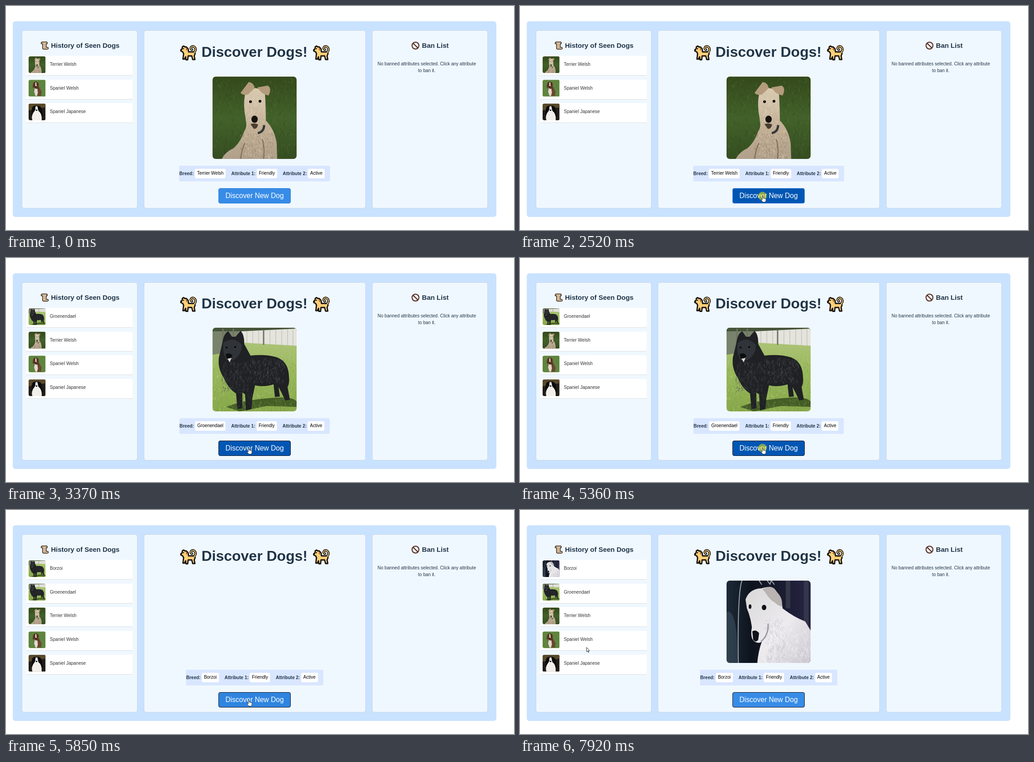
Animation, 1124 px wide and 498 px high, one loop 8 s. Source, as an HTML page:

```html
<!DOCTYPE html>
<html lang="en">
<head>
<meta charset="utf-8">
<title>Discover Dogs</title>
<style>
html, body { margin: 0; width: 100%; height: 100%; overflow: hidden; background: #fff; }
body { position: relative; font: 10px/15px Arial, "Liberation Sans", sans-serif; color: #213547; }
body > *, .panel, #center > *, .row > * { position: absolute; box-sizing: border-box; white-space: nowrap; }
#frame { left: 15px; top: 34px; width: 1070px; height: 435px; border-radius: 6px; background: #c9e2ff; }
.panel { top: 54px; height: 395.5px; border: 1px solid #cbd6e2; border-radius: 5px; background: #f0f8ff; }
h1, h2 { margin: 0; }
h1 { left: 432.4px; top: 82px; font-size: 32px; line-height: 40px; }
h2 { top: 78px; font-size: 15px; line-height: 20px; }
svg { overflow: visible; display: block; }
.row { position: absolute; left: 45px; width: 235px; height: 43px; background: #fff; border-bottom: 1px solid #dcdfe2; color: #333; }
.row svg { left: 5px; top: .5px; width: 37.5px; height: 37.5px; border-radius: 4px; overflow: hidden; }
.row span { left: 52px; top: 11px; }
#center { left: 0; top: 0; }
#photo { left: 457px; width: 186px; border-radius: 7px; overflow: hidden; }
#facts { left: 550px; top: 355px; height: 34.5px; transform: translateX(-50%); display: flex; align-items: center; border-radius: 3px; background: #d9e6ff; }
#facts b { margin: 0 2.8px 0 .5px; }
#facts span { height: 20.5px; line-height: 20.5px; padding: 0 4.7px; margin-right: 12px; border-radius: 3px; background: #fff; color: #000; }
#button { left: 470px; width: 160px; height: 34px; border: 1px solid #2b80dc; border-radius: 4px; color: #fff; font-size: 15.6px; line-height: 32px; text-align: center; }
#button.focus { border: 1.5px solid #101218; line-height: 31px; }
#ring { left: 527px; top: 413px; width: 19px; height: 19px; border-radius: 50%; background: rgba(255, 240, 0, .5); }
</style>
</head>
<body>
<svg width="0" height="0"><defs>
  <linearGradient id="lawn" x2="0" y2="1"><stop stop-color="#34491b"/><stop offset=".5" stop-color="#42612a"/><stop offset="1" stop-color="#354d20"/></linearGradient>
  <linearGradient id="coat" x2="0" y2="1"><stop stop-color="#d9cab1"/><stop offset=".6" stop-color="#c0ad93"/><stop offset="1" stop-color="#b0a08a"/></linearGradient>
  <linearGradient id="meadow" x2="0" y2="1"><stop stop-color="#b5c985"/><stop offset=".5" stop-color="#9ab85c"/><stop offset="1" stop-color="#87a84a"/></linearGradient>
  <linearGradient id="night"><stop stop-color="#1d2a38"/><stop offset=".3" stop-color="#0d131c"/><stop offset="1" stop-color="#272443"/></linearGradient>
  <linearGradient id="silk" x2="1" y2="1"><stop stop-color="#d9d8d8"/><stop offset=".55" stop-color="#edebee"/><stop offset="1" stop-color="#c9c5cf"/></linearGradient>

  <symbol id="terrier" viewBox="0 0 186 184" preserveAspectRatio="none">
    <path fill="url(#lawn)" d="M0 0H186V184H0z"/>
    <path data-blades="260,0,0,186,184,9" stroke="#597338"/>
    <path data-blades="160,0,0,186,184,9" stroke="#263b13"/>
    <path fill="url(#coat)" d="M72 38Q92 14 116 36Q118 70 118 98Q138 118 142 150L143 184H20Q28 168 46 160Q62 146 70 122Q78 112 73 92Q67 65 72 38z"/>
    <path fill="#b39b7b" d="M62 36L80 12Q92 14 93 26L78 40Q66 42 62 36zM99 24L122 20Q132 26 124 42Q114 40 107 34z"/>
    <path data-blades="150,72,42,42,70,6" stroke="#e6dac5"/>
    <path data-blades="230,60,126,76,56,6" stroke="#8e7d66"/>
    <path data-blades="160,68,118,64,62,6" stroke="#e0d1b9"/>
    <path fill="none" stroke="#33383b" stroke-width="5" d="M100 126Q114 123 114 108"/>
    <path fill="#4a3d31" d="M84 106Q93 102 101 107Q98 118 91 116z"/>
    <circle cx="84" cy="56" r="3"/><circle cx="105" cy="55" r="3"/>
    <ellipse cx="93" cy="95" rx="7" ry="8" fill="#15120f"/>
    <path fill="none" stroke="#786953" stroke-width="2" d="M62 184Q65 160 72 148M113 184Q116 160 110 140"/>
  </symbol>

  <symbol id="groenendael" viewBox="0 0 186 186">
    <path fill="url(#meadow)" d="M0 0H186V186H0z"/>
    <path fill="#78826c" d="M0 0H65V50L0 60z"/>
    <path fill="#46543a" d="M0 0H186V8H0z"/>
    <path fill="#e4e3dc" d="M64 8L186 2V40L150 38L64 33z"/>
    <path fill="none" stroke="#b4b5ae" d="M76 8V34M89 7V34M102 7V35M127 6V37M140 5V38M153 4V39M166 3V40M178 3V41"/>
    <path stroke="#74725f" stroke-width="3" d="M113 5V38M23 2V57M46 2V52"/>
    <path data-blades="340,0,58,186,128,7" stroke="#c3d68a"/>
    <path data-blades="180,0,65,186,120,7" stroke="#6f8f3e"/>
    <path fill="#445d26" d="M30 176Q75 158 150 155Q180 155 186 164V176L120 174L60 186z"/>
    <path data-blades="160,20,155,166,28,7" stroke="#7b9a48"/>
    <path fill="#1f2124" d="M22 32Q25 12 35 8L43 20L51 20L62 7Q71 16 70 36L84 62Q118 58 143 66Q168 76 169 108Q171 122 166 132L171 160L161 162L152 143L146 132L149 153L138 154L135 126Q112 133 94 128L88 157L86 181L74 184L72 148L66 144L66 179L55 181L52 146Q36 137 24 110Q11 90 14 66L18 50z"/>
    <path data-blades="200,20,74,60,65,9" stroke="#45494f"/>
    <path data-blades="200,82,68,76,52,9" stroke="#53575d"/>
    <path data-blades="60,54,135,34,42,6" stroke="#3f4348"/>
    <path fill="#303338" d="M24 34Q45 17 65 38Q65 60 46 72L31 72Q21 56 24 34z"/>
    <path fill="#0c0d0e" d="M29 59Q38 54 44 62L40 69L31 68z"/>
    <path fill="#e0d5d0" d="M33 69L42 67L38 77z"/>
    <circle cx="31" cy="44" r="2"/><circle cx="50" cy="43" r="2"/>
  </symbol>

  <symbol id="borzoi" viewBox="0 0 186 184" preserveAspectRatio="none">
    <path fill="url(#night)" d="M0 0H186V184H0z"/>
    <path fill="#4d6370" opacity=".4" d="M0 70Q25 60 24 184H0z"/>
    <path fill="none" stroke="#9aa5ad" stroke-width="2" d="M34 0Q24 28 26 184M72 0L78 9M90 0L96 8L99 0L106 9"/>
    <path fill="none" stroke="#333748" stroke-width="10" d="M136 0V62M176 0V100"/>
    <path fill="url(#silk)" d="M42 42Q50 18 78 17Q102 8 113 28Q122 40 124 62Q150 82 174 91L186 111V184H68Q70 158 78 136Q70 142 60 134Q52 126 56 104Q53 80 45 62z"/>
    <path fill="#b9b4b1" d="M80 19Q101 6 111 25Q126 40 122 58Q112 55 107 49Q97 44 88 30z"/>
    <path data-blades="230,80,105,104,78,12" stroke="#faf9fb"/>
    <path data-blades="130,88,82,42,98,12" stroke="#bcb9c5"/>
    <path fill="none" stroke="#9d9aa8" stroke-width="3" d="M76 136Q93 122 92 96"/>
    <ellipse cx="83" cy="60" rx="5" ry="6" fill="#11131a"/><ellipse cx="52" cy="58" rx="3" ry="5" fill="#11131a"/>
    <path fill="#10121a" d="M57 113Q65 108 72 117L70 132Q65 139 59 132z"/>
  </symbol>

  <symbol id="spaniel" viewBox="0 0 186 184">
    <path fill="#5d843d" d="M0 0H186V184H0z"/>
    <path data-blades="330,0,0,186,184,16" stroke="#86a967"/>
    <path fill="#6b4632" d="M62 74L112 70L142 130L136 176H76L58 130z"/>
    <path fill="#e2dace" d="M68 88L96 96L102 140L92 178H76L60 130z"/>
    <path fill="#5b3524" d="M48 48Q52 19 84 20Q113 23 112 60L106 85L115 106L95 97L80 100L60 82L45 88z"/>
    <path fill="#eee6d9" d="M74 30L84 28L88 76L74 82z"/><circle cx="79" cy="76" r="8" fill="#251815"/>
  </symbol>

  <symbol id="japanese" viewBox="0 0 186 184">
    <path fill="#201d18" d="M0 0H186V184H0z"/><path fill="#594929" d="M0 0H186V40L0 75z"/>
    <path fill="#0b0b0e" d="M35 70Q34 15 88 20Q146 18 145 78L160 134L123 147L50 125L29 132z"/>
    <path fill="#f2efea" d="M78 28L96 27L108 80Q150 109 143 184H42Q23 130 67 80z"/>
    <circle cx="67" cy="62" r="8"/><circle cx="112" cy="60" r="8"/><ellipse cx="87" cy="72" rx="10" ry="7"/>
  </symbol>

  <symbol id="pup" viewBox="0 0 37 36">
    <path fill="none" stroke="#151310" stroke-width="5.2" stroke-linecap="round" d="M31 17Q36 13 33.5 7Q30 1.5 25 5Q22 9 26.5 11"/>
    <path fill="#ffd079" stroke="#151310" stroke-width="2.8" stroke-linejoin="round" d="M5 5L8 3L11 5H14L18 9L19 16H28Q33 16 33.5 20L31.5 25L33 33H28L26 25H18L17 33.5H13L12.5 27L10 32H6.5L8 20L6 16L1.8 14L2 11L5 9z"/>
    <path fill="none" stroke="#ffd079" stroke-width="1.8" stroke-linecap="round" d="M31 18Q36 13 33.5 7Q30 1.5 25 5Q22 9 26.5 11"/>
    <path fill="#a86b35" d="M13 6L16 8V14L13 11z"/><circle cx="8" cy="9" r="1.2"/><circle cx="3" cy="12" r="1.5"/>
  </symbol>
</defs></svg>

<div id="frame"></div>
<div class="panel" style="left:35px;width:255.5px"></div>
<div class="panel" style="left:305px;width:490.5px"></div>
<div class="panel" style="left:810px;width:255.5px"></div>

<svg style="left:77px;top:79px" width="18" height="18">
  <path fill="#e7c9a2" stroke="#29211b" stroke-width="1.5" stroke-linejoin="round" d="M3 1H13Q15 2 14 5H12V13H16Q18 17 14 17H6Q3 16 4 13V5H1Q0 2 3 1z"/>
  <path fill="none" stroke="#a98c6c" d="M3 2Q5 3 4 5M6 5H10M6 8H10M6 11H10M6 14H14"/>
</svg>
<h2 style="left:99.5px">History of Seen Dogs</h2>
<div id="history" style="left:0;top:0"></div>

<svg style="left:897px;top:79px" width="18" height="18" fill="none">
  <g stroke="#2c1715" stroke-width="2.2"><circle cx="9" cy="9" r="7.6" fill="#f8f6f5"/><path d="M4 4L14 14"/></g>
  <g stroke="#a65345" stroke-width=".8"><circle cx="9" cy="9" r="7.6"/><path d="M4 4L14 14"/></g>
</svg>
<h2 style="left:920.3px">Ban List</h2>
<div style="left:811px;top:121px;width:240px;text-align:center">No banned attributes selected. Click any attribute<br>to ban it.</div>

<div id="center">
  <svg style="left:385px;top:86px" width="37" height="36"><use href="#pup"/></svg>
  <h1>Discover Dogs!</h1>
  <svg style="left:679px;top:86px" width="37" height="36"><use href="#pup"/></svg>
</div>
<div id="loading" style="left:491px;top:265.5px">Loading a dog for you...</div>
<svg id="photo"><use width="100%" height="100%"/></svg>
<div id="facts"></div>
<div id="button">Discover New Dog</div>
<div id="ring"></div>
<svg id="cursor" style="left:0;top:0" width="16" height="18" fill="#fff" stroke="#151515" stroke-linejoin="round">
  <path id="arrow" stroke-width=".9" d="M.4 .5V10.2L2.6 8.2L4 11.6L5.5 11L4.1 7.7H7z"/>
  <path id="hand" stroke-width=".8" d="M-1 1Q0 -.4 1 1V5.4L2 5L3 5.8L4.2 5.5L5 6.5L6.2 6.2L7.2 7.3V10.5L5.7 14H.3L-3.4 9.2Q-3.3 7.6 -1.8 8.2L-1 9z"/>
</svg>

<script>
const $ = id => document.getElementById(id);
const LOOP = 8000;
const BREEDS = [
  ["Borzoi", "borzoi"], ["Groenendael", "groenendael"], ["Terrier Welsh", "terrier"],
  ["Spaniel Welsh", "spaniel"], ["Spaniel Japanese", "japanese"]
];
// Index of the newest breed, and when its stages begin.
const VISITS = [
  { newest: 2, ready: 0, shown: 0, leave: 2730 },
  { newest: 1, ready: 3110, shown: 3250, leave: 5570 },
  { newest: 0, ready: 5810, shown: 5970, leave: LOOP }
];
const CLICKS = [2520, 5360], CLICK_LENGTH = 210;
const HOVER = [[1330, 0], [1560, 1], [2730, 1], [2980, 0], [3110, 0], [3370, 1],
  [5570, 1], [5800, 0], [5810, 0], [6080, 1], [6680, 1], [6930, 0]];
const PATH = [[500, 748, 491], [560, 717, 488], [950, 717, 488], [1560, 537, 422],
  [6570, 537, 422], [6980, 117, 123], [7310, 117, 123], [7920, 147, 305]];

const linear = p => p, smooth = p => p * p * (3 - 2 * p);

function track(keys, t, ease) {
  const next = keys.findIndex(k => k[0] > t);
  if (next <= 0) return keys.at(next).slice(1);
  const a = keys[next - 1], b = keys[next];
  const p = ease((t - a[0]) / (b[0] - a[0]));
  return a.slice(1).map((v, i) => v + (b[i + 1] - v) * p);
}

// Grass and fur: short slanted strokes scattered over a box.
let seed = 7;
const random = () => (seed = (seed * 16807) % 2147483647) / 2147483647;
for (const path of document.querySelectorAll("[data-blades]")) {
  const [count, x, y, w, h, length] = path.dataset.blades.split(",").map(Number);
  let d = "";
  for (let i = 0; i < count; i++) {
    d += `M${x + random() * w} ${y + random() * h}l${(random() - .5) * length} ${random() * length}`;
  }
  path.setAttribute("d", d);
  path.setAttribute("fill", "none");
  path.setAttribute("opacity", ".55");
}

const show = (id, visible) => $(id).style.display = visible ? "" : "none";

function layOut(visit, loading, loaded) {
  const { newest } = visit;
  const [name, art] = BREEDS[newest];
  const drop = loaded && newest === 1 ? 1.25 : 0;
  $("history").innerHTML = BREEDS.slice(newest).map(([breed, picture], i) => {
    const thumb = i || loaded || loading ? picture : BREEDS[newest + 1][1];
    return `<div class="row" style="top:${111 + i * 52.7}px"><svg><use href="#${thumb}" width="100%" height="100%"/></svg><span>${breed}</span></div>`;
  }).join("");
  $("facts").innerHTML = [["Breed", name], ["Attribute 1", "Friendly"], ["Attribute 2", "Active"]]
    .map(([label, value]) => `<b>${label}:</b><span>${value}</span>`).join("");
  $("center").style.top = (loading ? 100 : -drop) + "px";
  $("facts").style.top = 355 + drop + "px";
  $("button").style.top = (loading ? 305.5 : 405 + drop) + "px";
  $("photo").style.top = 156.5 - drop + "px";
  $("photo").style.height = 183.5 + 2 * drop + "px";
  $("photo").firstElementChild.setAttribute("href", "#" + art);
  show("loading", loading);
  show("facts", !loading);
  show("photo", loaded);
}

let lastKey;
function draw(now) {
  const t = now % LOOP;
  const visit = VISITS.findLast(v => t >= v.ready);
  const loading = t >= visit.leave;
  const loaded = !loading && t >= visit.shown;
  const key = [visit.newest, loading, loaded].join();
  if (key !== lastKey) layOut(visit, loading, loaded);
  lastKey = key;

  const [hover] = track(HOVER, t, linear);
  $("button").style.background = `color-mix(in srgb, #0056b3 ${hover * 100}%, #378ce7)`;
  $("button").className = t >= CLICKS[0] + CLICK_LENGTH ? "focus" : "";
  show("ring", CLICKS.some(c => t >= c && t < c + CLICK_LENGTH));

  const [x, y] = track(PATH, t, smooth);
  const pointing = t >= 1330 && t < 6680;
  $("cursor").style.transform = `translate(${x}px, ${y}px)`;
  show("cursor", t >= 500);
  show("hand", pointing);
  show("arrow", !pointing);
}

function frame() {
  draw(performance.now());
  requestAnimationFrame(frame);
}
frame();
</script>
</body>
</html>
```
